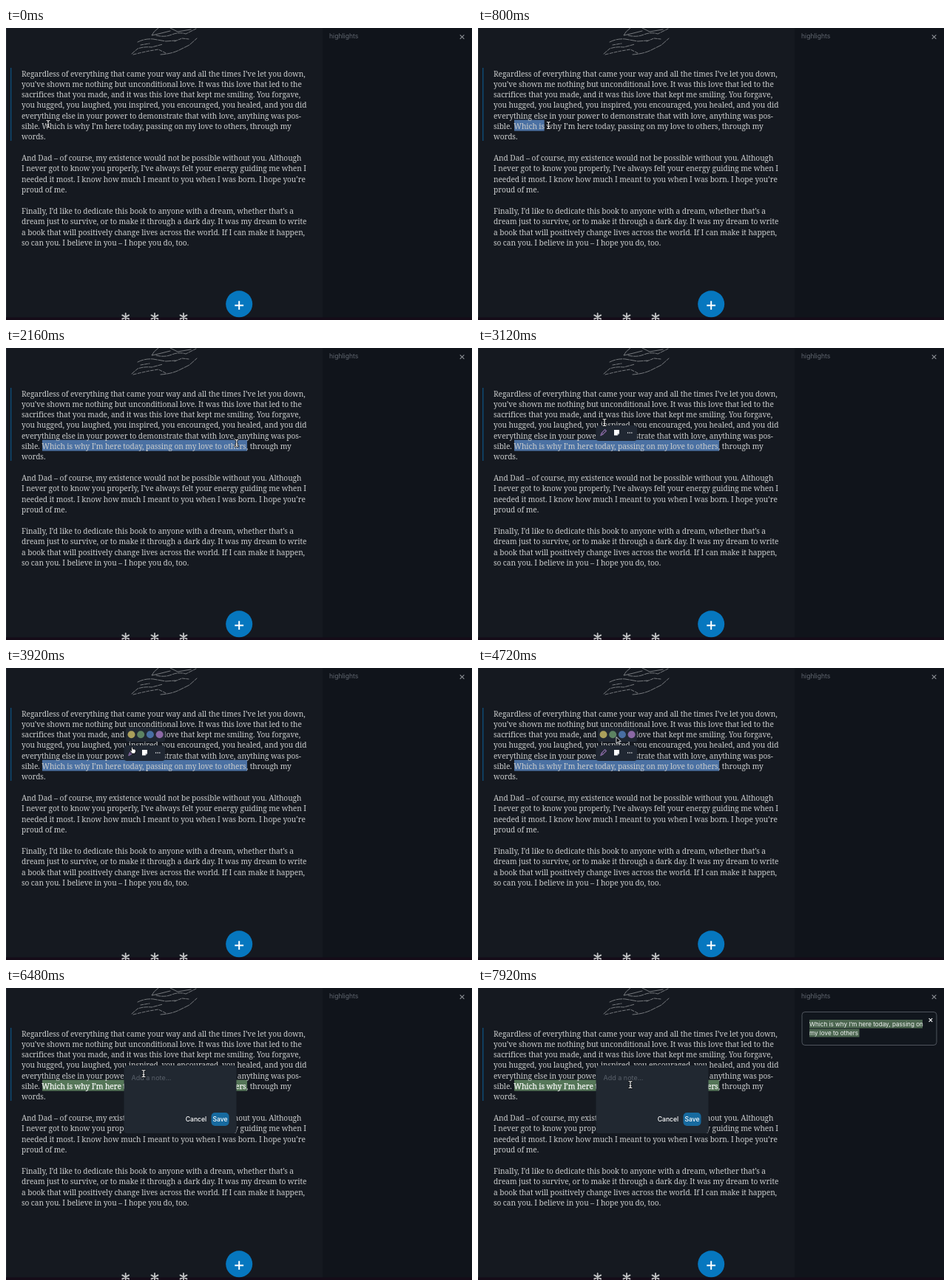
These frames come from a looping animation (630 px wide and 396 px high, 8000 ms). An HTML page:

```html
<!DOCTYPE html>
<html lang="en">
<head>
<meta charset="utf-8">
<style>
  html, body { margin: 0; width: 100%; height: 100%; overflow: hidden; background: #151920; }
  svg { display: block; width: 630px; height: 396px; }
  .book { font: 10.2px "Noto Serif", serif; letter-spacing: -.085px; fill: #cbcdcd; }
  .ui { font-family: Inter, sans-serif; }
  .line { fill: none; stroke-linecap: round; stroke-linejoin: round; }
</style>
</head>
<body>
<svg viewBox="0 0 630 396">
  <rect width="630" height="396" fill="#151920"/>
  <rect width="1" height="396" fill="#252a32"/>
  <rect x="428" width="202" height="396" fill="#10141b"/>

  <g class="line" stroke="#a0a3a5" stroke-width=".7">
    <path d="M206 0Q199 5 197 10L206 8L222 4M222 0L232 5L250 2"/>
    <path d="M203 10Q214 13 224 9T243 8L257 1" stroke-dasharray="6 1.5"/>
    <path d="M178 19Q188 14 199 15L216 18L229 17" stroke-dasharray="8 1.5"/>
    <path d="M170 35L178 28Q187 25 197 26L212 22" stroke-dasharray="5 1.5"/>
    <path d="M172 36Q184 33 194 31L206 29L216 34" stroke-dasharray="4 2"/>
    <path d="M209 36Q224 35 234 30L248 23L258 14" stroke-dasharray="7 1.5"/>
    <path d="M228 18L238 14L247 15M182 23L194 21" stroke-dasharray="4 1.5"/>
  </g>

  <rect x="6" y="54" width="1.4" height="99" fill="#0e4b77"/>
  <rect id="mark" x="49" y="124.6" height="15"/>
  <g id="page" class="book"></g>
  <rect y="392.5" width="630" height="3.5" fill="#150c18"/>
  <g id="stars" class="line" stroke="#c3c5c6" stroke-width="1.8"></g>

  <circle cx="315.2" cy="374.3" r="18" fill="#0677bf"/>
  <path d="M309.3 376.2h11.8M315.2 370.3v11.8" stroke="#fff" stroke-width="2"/>

  <g class="ui">
    <text x="437" y="13.5" font-size="8.6" fill="#616770">highlights</text>
    <path d="M613.8 9.3l5.6 5.6m0-5.6l-5.6 5.6" stroke="#8c9096" stroke-width="1.1"/>
    <g id="card">
      <rect x="438" y="32.5" width="182" height="45" rx="4" fill="#11161d" stroke="#565c65" stroke-width=".9"/>
      <path d="M448 43h153v11.5h-153zM448 55.5h67.5v11h-67.5z" fill="#4c6650"/>
      <g font-size="8.15" fill="#f0f2f2">
        <text x="448" y="51.5">Which is why I’m here today, passing on</text>
        <text x="448" y="64">my love to others</text>
      </g>
      <path d="M609.6 41.2l4.6 4.6m0-4.6l-4.6 4.6" stroke="#f2f3f4" stroke-width="1.2"/>
    </g>

    <g id="palette"><rect x="162" y="81" width="53" height="19" rx="3" fill="#202732"/></g>
    <g id="bar">
      <rect x="159.5" y="105" width="55.5" height="21" rx="4" fill="#202732"/>
      <path id="pen" class="line" d="M165.8 118.7l1.2-3.2 4.6-4.8 1.8 1.8-4.7 4.7zM167.3 115.4l1.7 1.7" stroke-width="1.1"/>
      <path d="M184 111h7v5l-2.5 2.5H184z" fill="#fff"/>
      <path d="M188.5 118.5v-2.5h2.5z" fill="#9ba3ae"/>
      <path class="line" d="M202.6 114.9h.01M205.2 114.9h.01M207.8 114.9h.01" stroke="#fff" stroke-width="1.5"/>
    </g>
    <g id="note">
      <rect x="159.5" y="105" width="152" height="92" rx="4" fill="#212831"/>
      <text x="169.5" y="124.5" font-size="9" fill="#59606a">Add a note...</text>
      <rect x="277.5" y="169" width="24" height="18" rx="5" fill="#176a9f"/>
      <g font-size="8.6" font-weight="500" fill="#fff" text-anchor="middle">
        <text x="257" y="181">Cancel</text>
        <text x="289.5" y="181">Save</text>
      </g>
    </g>
  </g>

  <g id="cursor" class="line">
    <g id="beam">
      <path d="M-2-4.5Q0-4.5 0-3.2Q0-4.5 2-4.5M0-3.2v6.4M-2 4.5Q0 4.5 0 3.2Q0 4.5 2 4.5M-1 1.5h2" stroke="#080a0d" stroke-width="2.6"/>
      <path d="M-2-4.5Q0-4.5 0-3.2Q0-4.5 2-4.5M0-3.2v6.4M-2 4.5Q0 4.5 0 3.2Q0 4.5 2 4.5M-1 1.5h2" stroke="#fff" stroke-width="1.1"/>
    </g>
    <path id="arrow" d="M0-4v8l2-1.8 1.3 2.7 1.4-.7-1.3-2.6h2.5z" fill="#090b0e" stroke="#fff" stroke-width=".8"/>
    <path id="hand" d="M-1.5 0v-3.2q1-1.4 1.9 0v2q2.2-.3 4 1.2v2.2L3.3 5h-4L-3.4 1.3q.5-1.4 1.9-.1z" fill="#fff" stroke="#080a0d" stroke-width=".9"/>
  </g>
</svg>
<script>
const $ = id => document.getElementById(id);
const LOOP = 8000, BASE = 65.5, STEP = 14.25;
const BAR = 2240, PALETTE = 3920, GREEN = 5040, NOTE = 6080, CARD = 6560;

function add(parent, tag, attrs, text = "") {
  const el = document.createElementNS("http://www.w3.org/2000/svg", tag);
  for (const k in attrs) el.setAttribute(k, attrs[k]);
  el.textContent = text;
  parent.append(el);
  return el;
}

const paragraphs = [
  [0, `Regardless of everything that came your way and all the times I’ve let you down,
you’ve shown me nothing but unconditional love. It was this love that led to the
sacrifices that you made, and it was this love that kept me smiling. You forgave,
you hugged, you laughed, you inspired, you encouraged, you healed, and you did
everything else in your power to demonstrate that with love, anything was pos-
sible. |Which is why I’m here today, passing on my love to others|, through my
words.`],
  [114.6, `And Dad – of course, my existence would not be possible without you. Although
I never got to know you properly, I’ve always felt your energy guiding me when I
needed it most. I know how much I meant to you when I was born. I hope you’re
proud of me.`],
  [186.7, `Finally, I’d like to dedicate this book to anyone with a dream, whether that’s a
dream just to survive, or to make it through a dark day. It was my dream to write
a book that will positively change lives across the world. If I can make it happen,
so can you. I believe in you – I hope you do, too.`]
];

let quote;
for (const [top, copy] of paragraphs) {
  copy.split("\n").forEach((line, i) => {
    const row = add($("page"), "text", { x: 21, y: BASE + top + i * STEP });
    const parts = line.split("|").map(s => add(row, "tspan", { style: "white-space:pre" }, s));
    if (parts.length > 1) quote = parts[1];
  });
}
for (const x of [161.7, 201, 240])
  add($("stars"), "path", { d: `M${x} 387v10M${x - 4.5} 389.4l9 5.2m0-5.2l-9 5.2` });
["#aa9f5b", "#5d8362", "#486fa3", "#8b68a5"].forEach((fill, i) =>
  add($("palette"), "circle", { cx: 169.5 + i * 12.7, cy: 90.2, r: 5, fill }));

// time, x, y
const path = [
  [0, 57, 130], [80, 57, 130], [400, 50, 132], [640, 50, 132], [960, 140, 132],
  [1280, 267, 132], [1440, 301, 132], [1520, 304, 132], [1920, 328, 132],
  [2080, 328, 132], [2480, 248, 116], [2880, 174, 103], [3120, 171, 101],
  [3520, 169, 114], [3840, 169, 115], [4320, 181, 92], [4560, 183, 92],
  [4720, 187, 98], [4960, 183, 92], [5200, 183, 92], [5600, 187, 115],
  [6400, 187, 115], [6480, 186, 116], [6960, 206, 131], [LOOP, 206, 131]
];

function pos(t) {
  const i = Math.max(1, path.findIndex(p => p[0] >= t));
  const [a, x, y] = path[i - 1], [b, u, v] = path[i];
  const k = (t - a) / (b - a);
  return [x + (u - x) * k, y + (v - y) * k];
}

const show = (id, on) => { $(id).style.display = on ? "" : "none"; };

function draw(t) {
  const [x, y] = pos(t);
  const noted = t >= NOTE, bar = t >= BAR && !noted, palette = t >= PALETTE && !noted;

  const end = t < 1920 ? Math.min(326, pos(Math.max(0, t - 20))[0]) : 326;
  $("mark").setAttribute("width", t < 640 ? 0 : Math.max(0, end - 49));
  $("mark").setAttribute("fill", noted ? "#557658" : "#4b71a3");
  quote.style.fill = noted ? "#f4f6f4" : "";
  quote.style.stroke = noted ? "#f4f6f4" : "none";
  quote.style.strokeWidth = ".25px";

  show("bar", bar);
  show("palette", palette);
  show("note", noted);
  show("card", t >= CARD);
  $("pen").setAttribute("stroke", t < GREEN ? "#8a6aa5" : "#6d8a74");

  const hand = bar && y > 105 && x < 216 || palette && y < 96;
  const arrow = palette && !hand;
  show("hand", hand);
  show("arrow", arrow);
  show("beam", !hand && !arrow);
  $("cursor").setAttribute("transform", `translate(${x} ${y})`);
}

function tick() {
  draw(performance.now() % LOOP);
  requestAnimationFrame(tick);
}
tick();
</script>
</body>
</html>
```
